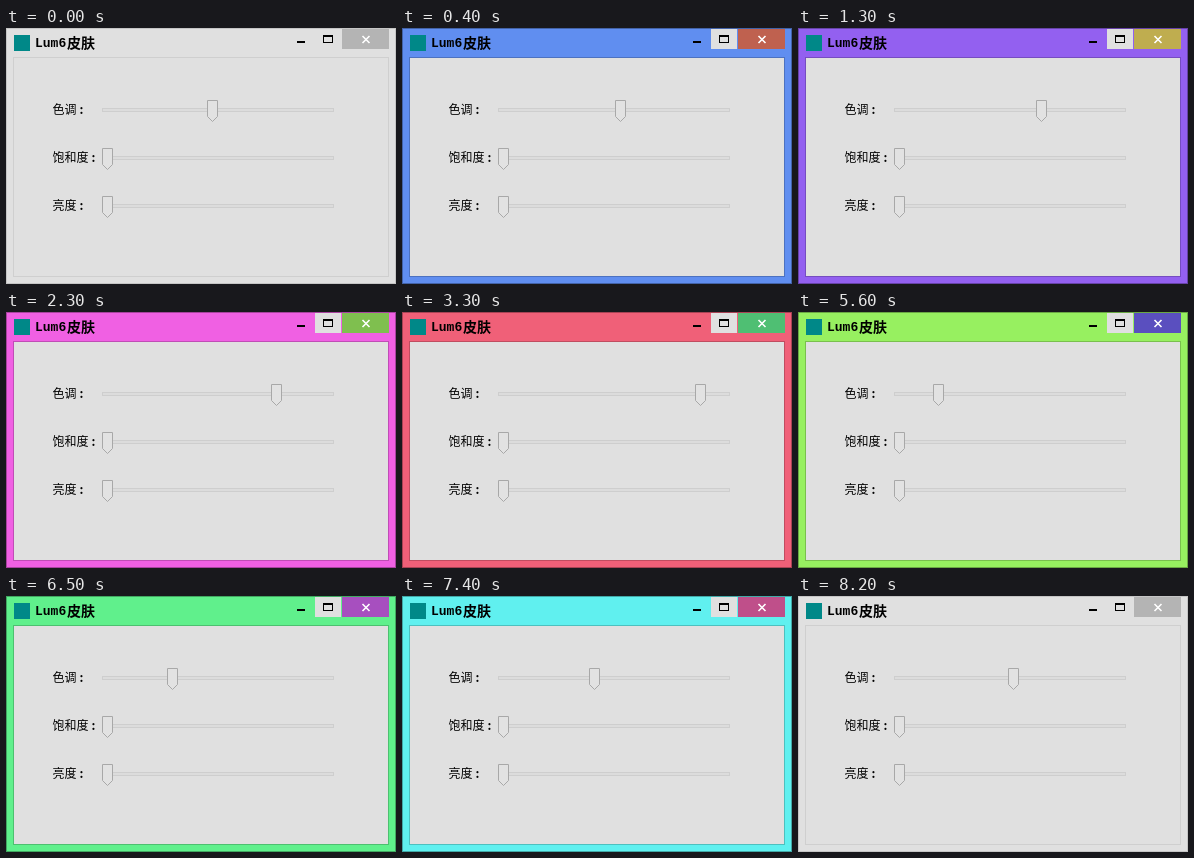
Animation of 390 by 256 pixels, one loop 8300 ms. Source, as an HTML page:

```html
<!DOCTYPE html>
<html lang="zh-Hans">
<head>
<meta charset="utf-8">
<style>
  html, body { margin: 0; width: 100%; height: 100%; overflow: hidden; }
  svg { display: block; width: 390px; height: 256px; }
  text { font: 12px "Noto Sans CJK SC", "Noto Sans CJK", sans-serif; }
  .title { font-size: 14px; font-weight: bold; }
  .latin { font: bold 13px "Liberation Mono", monospace; }
  .colon { font-weight: bold; }
  .line { fill: none; stroke: #000; }
  .track { fill: #dcdcdc; stroke: #cecece; }
  .thumb { fill: #e2e2e2; stroke: #a8a8a8; }
</style>
</head>
<body>
<svg viewBox="0 0 390 256">
  <rect id="frame" width="390" height="256"/>
  <rect id="outer" class="line" x=".5" y=".5" width="389" height="255"/>
  <rect x="8" y="30" width="374" height="218" fill="#e0e0e0"/>
  <rect id="inner" class="line" x="7.5" y="29.5" width="375" height="219"/>

  <rect x="8" y="7" width="16" height="16" fill="#088"/>
  <text class="latin" x="29" y="19">Lum6</text>
  <text class="title" x="61" y="20">皮肤</text>

  <rect id="hover" x="309" y="1" width="26" height="20" fill="#e0e0e0"/>
  <rect id="close" x="336" y="1" width="47" height="20"/>
  <path d="M291 13h8v2h-8zM317 7h10v8h-10zM318 9v5h8v-5z" fill-rule="evenodd"/>
  <path d="M356.5 8l7 7m0-7l-7 7" fill="none" stroke="#fff" stroke-width="1.6"/>

  <g id="sliders"></g>
</svg>
<script>
const LOOP = 8300, STEP = 100, LEFT = 96;
const $ = id => document.getElementById(id);

$("sliders").innerHTML = ["色调", "饱和度", "亮度"].map((label, row) => `
  <g transform="translate(0 ${row * 48})">
    <text x="46.5" y="86">${label}<tspan class="colon" dx="3">:</tspan></text>
    <rect class="track" x="96.5" y="80.5" width="231" height="3"/>
    <path class="thumb" transform="translate(${LEFT} 72)" d="M.5 .5h10v16l-5 5-5-5z"/>
  </g>`).join("");
const hueThumb = document.querySelector(".thumb");

function draw(now) {
  const step = Math.floor(now % LOOP / STEP);
  // The hue slider wraps to its left end at step 42.
  const x = step < 42 ? 201.95 + 2.775 * step : LEFT + 2.85 * (step - 42);
  const hue = 33 + 1.605 * (x - LEFT);
  const active = step > 0 && step < 82;

  hueThumb.setAttribute("transform", `translate(${Math.floor(x)} 72)`);
  $("frame").style.fill = active ? `hsl(${hue} 83% 66%)` : "#e0e0e0";
  $("close").style.fill = active ? `hsl(${hue + 149} 47% 53%)` : "#b4b4b4";
  $("hover").style.opacity = active ? 1 : 0;
  $("outer").style.strokeOpacity = active ? 0.3 : 0.12;
  $("inner").style.strokeOpacity = active ? 0.2 : 0.08;
}

const start = performance.now();
function tick() {
  draw(performance.now() - start);
  requestAnimationFrame(tick);
}
tick();
</script>
</body>
</html>
```
